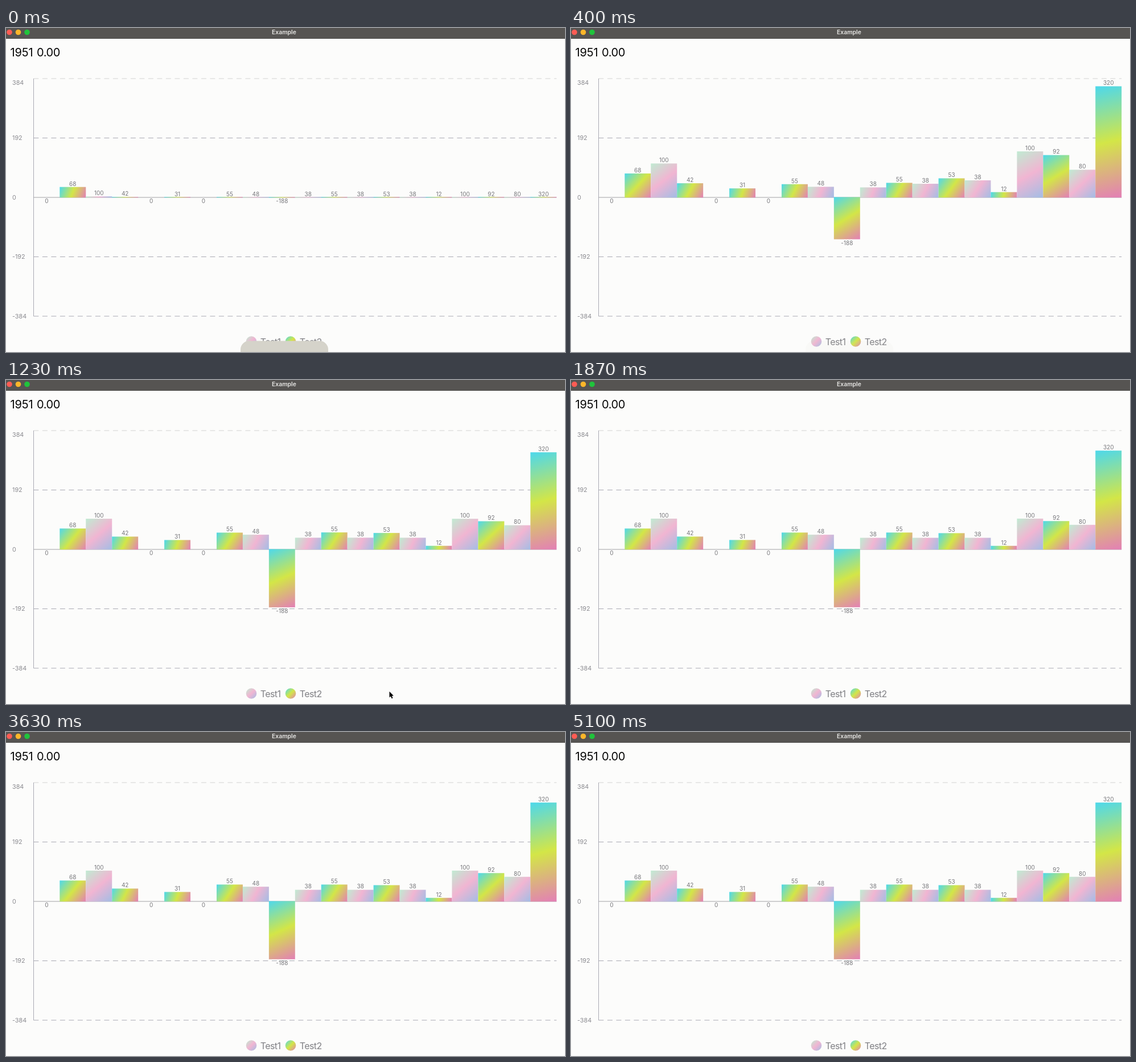
Animation, 982 px wide and 570 px high, one loop 5130 ms. Source, as an HTML page with a canvas:

```html
<!DOCTYPE html>
<html lang="en">
<head>
<meta charset="utf-8">
<title>Example</title>
<style>
  html, body { margin: 0; width: 100%; height: 100%; overflow: hidden; background: #fcfcfb; }
  canvas { display: block; width: 982px; height: 570px; }
</style>
</head>
<body>
<canvas id="stage" width="982" height="570"></canvas>
<script>
const ctx = document.getElementById('stage').getContext('2d');
const LOOP = 5130, STEP = 1000 / 30;
const FONT = 'Inter, Roboto, sans-serif';
const values = [0, 68, 100, 42, 0, 31, 0, 55, 48, -188, 38, 55, 38, 53, 38, 12, 100, 92, 80, 320];
const palettes = [
  ['#c0ebd2', '#f1b5d2', '#a3bde5'],
  ['#4dd8ec', '#d3e647', '#e37fb6']
];
const LEFT = 48.4, RIGHT = 967.2, TOP = 89, ZERO = 298, BOTTOM = 507;
const SCALE = (ZERO - TOP) / 384;
const BAR = (RIGHT - LEFT) / values.length;

// Underdamped spring, each pair of bars starting 40 ms after the last
const HALF_PERIOD = 149.5, DELAY = 40, LEAD = 53, DECAY = 0.2041;

function spring(ms) {
  if (ms <= 0) return 0;
  const a = Math.PI * ms / HALF_PERIOD;
  return 1 - Math.exp(-DECAY * a) * (Math.cos(a) + DECAY * Math.sin(a));
}

const clamp = v => Math.max(0, Math.min(1, v));

function text(str, x, y, size, color, align = 'left', weight = 400, spacing = 0) {
  ctx.font = `${weight} ${size}px ${FONT}`;
  ctx.letterSpacing = spacing + 'px';
  ctx.textAlign = align;
  ctx.textBaseline = 'alphabetic';
  ctx.fillStyle = color;
  ctx.fillText(str, x, y + size * 0.364);
}

function diagonal(x, y, w, h, colors) {
  const g = ctx.createLinearGradient(x, y, x + w, y + h);
  colors.forEach((c, i) => g.addColorStop(i / 2, c));
  return g;
}

function disc(x, y, r, fill) {
  ctx.fillStyle = fill;
  ctx.beginPath();
  ctx.arc(x, y, r, 0, 7);
  ctx.fill();
}

function line(x1, y1, x2, y2, color, dash = []) {
  ctx.strokeStyle = color;
  ctx.lineWidth = 1;
  ctx.setLineDash(dash);
  ctx.beginPath();
  ctx.moveTo(x1, y1);
  ctx.lineTo(x2, y2);
  ctx.stroke();
  ctx.setLineDash([]);
}

function drawWindow() {
  ctx.fillStyle = '#fcfcfb';
  ctx.fillRect(0, 0, 982, 570);
  ctx.fillStyle = '#565452';
  ctx.fillRect(0, 0, 982, 19);
  ['#ff5c54', '#ffb62a', '#20c33c'].forEach((c, i) => disc(6 + 15.5 * i, 7.5, 4.8, c));
  text('Example', 488.5, 7.4, 10.4, '#e6e5e3', 'center', 600);
  text('1951', 7.5, 43.2, 20, '#050505', 'left', 400, -0.1);
  text('0.00', 54, 43.2, 20, '#050505', 'left', 400, -0.4);
}

function drawAxes() {
  for (let k = 2; k >= -2; k--) {
    const y = ZERO - k * 104.5;
    const py = Math.floor(y) + 0.5 - (k === 2 || k === -2 ? 0.5 : 0);
    if (k) line(LEFT, py, RIGHT, py, k === 2 ? '#d3d3d2' : '#a9a9b3', [9, 6.5]);
    text(String(k * 192), 11, k === 2 ? 96 : y, 10.8, '#8b8b90');
  }
  line(48.5, TOP, 48.5, BOTTOM, '#a9a9b3');
  line(LEFT, ZERO, RIGHT, ZERO, '#a0a0a4');
}

function drawBars(t) {
  ctx.save();
  ctx.beginPath();
  ctx.rect(0, 88, 982, 430);
  ctx.clip();
  const labels = [];
  values.forEach((v, i) => {
    const grow = spring(t + LEAD - DELAY * (i >> 1));
    const size = Math.abs(v) * SCALE * grow;
    const x = LEFT + i * BAR;
    if (v) {
      const h = Math.max(size, 1);
      const y = v > 0 ? ZERO + 0.3 - h : ZERO - 0.5;
      ctx.fillStyle = diagonal(x, y, BAR, h, palettes[i % 2]);
      ctx.fillRect(x, y, BAR, h);
    }
    labels.push([v, x + BAR / 2, v > 0 ? ZERO - size - 5.5 : ZERO + size + 6.4]);
  });
  labels.forEach(([v, x, y]) => text(String(v), x, y, 10, '#77777b', 'center'));
  ctx.restore();
}

function drawLegend() {
  ['Test1', 'Test2'].forEach((name, i) => {
    const x = 431 + 69 * i;
    disc(x, 551.5, 9.3, diagonal(x - 9.3, 542.2, 18.6, 18.6, palettes[i]));
    text(name, x + 15.7, 552, 16, '#808085', 'left', 400, -0.6);
  });
}

function drawPill(t) {
  const alpha = 1 - clamp((t - 30) / 400);
  if (!alpha) return;
  ctx.globalAlpha = alpha;
  ctx.fillStyle = '#d5d3ca';
  ctx.beginPath();
  ctx.roundRect(412, 550.5, 154, 50, 15);
  ctx.fill();
  ctx.globalAlpha = 1;
}

function drawCursor(t) {
  if (t < 1190 || t > 1520) return;
  const p = Math.pow(clamp((t - 1240) / 260), 2);
  ctx.save();
  ctx.translate(673.5 + 90 * p, 548 - 524 * p);
  ctx.beginPath();
  [[0, 0], [0, 10.5], [2.4, 8.4], [4.2, 12.4], [6, 11.6], [4.3, 7.7], [7.4, 7.5]]
    .forEach(([x, y]) => ctx.lineTo(x, y));
  ctx.closePath();
  ctx.lineJoin = 'round';
  ctx.lineWidth = 1.6;
  ctx.strokeStyle = '#fff';
  ctx.stroke();
  ctx.fillStyle = '#000';
  ctx.fill();
  ctx.restore();
}

const start = performance.now();

function draw() {
  const now = Math.max(0, performance.now() - start) % LOOP;
  const t = Math.floor((now + 4) / STEP) * STEP;
  drawWindow();
  drawAxes();
  drawBars(t);
  drawLegend();
  drawPill(t);
  drawCursor(t);
  requestAnimationFrame(draw);
}
draw();
</script>
</body>
</html>
```
